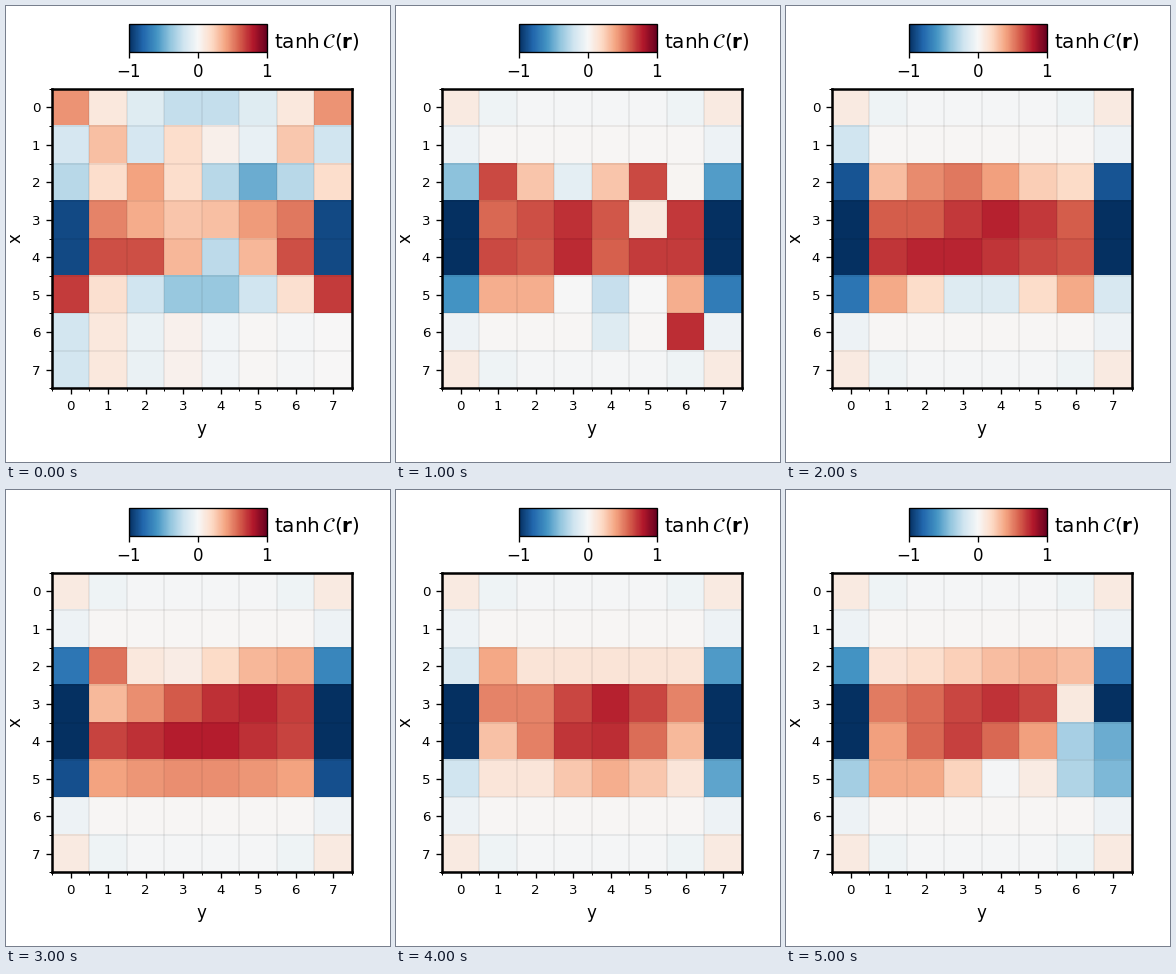
Animation of 384x456 px, one loop 6000 ms. Source, as a matplotlib script:

```python
import numpy as np
import matplotlib.pyplot as plt
from matplotlib.animation import FuncAnimation
from matplotlib.cm import ScalarMappable
from matplotlib.colors import Normalize

W, H, DPI = 384, 456, 120
N = 8
col = np.arange(N)
bowl = ((col - 3.5) / 3.5) ** 2


def wave(base, amp=0, peak=0, period=1):
    return base + amp * np.cos(2 * np.pi * (col - peak) / period)


def noisy():
    """Unordered start: bowls, ripples and a decaying zigzag."""
    zigzag = -0.18 * np.cos(np.pi * col) * np.exp(-col / 2)
    f = np.array([
        0.7 * bowl - 0.25,
        wave(0.05, 0.25, 1, 2.4),
        wave(-0.05, 0.45, 2, 6),
        wave(0.4, 0.13, 0.3, 6),
        wave(0.42, 0.28, 1.5, 5),
        1.1 * bowl - 0.4,
        zigzag,
        zigzag,
    ])
    f[3:5, ::7] = -0.9
    f[4, 4] -= 0.4
    return f


def ribbon(rows, upper, lower, bumps=()):
    """Four wavy rows between negative walls, on a calm border field."""
    f = np.full((N, N), 0.01)
    f[::7] = -0.015
    f[::7, 1::5] = -0.045
    f[::7, ::7] = 0.09
    f[1:7, ::7] = -0.05
    f[2:6, 1:7] = np.array(rows)[:, 1:7]
    f[2, ::7] = upper
    f[3:5, ::7] = -1
    f[5, ::7] = lower
    for r, c, dv in bumps:
        f[r, c] += dv
    return f


fields = [
    noisy(),
    ribbon([wave(0.28, 0.38, 1, 4),
            wave(0.65, 0.08, 2.9, 3.5),
            wave(0.67, 0.08, 5.5, 2.6),
            wave(0.10, 0.33, 1.5, 5)],
           (-0.41, -0.56), (-0.60, -0.70),
           [(2, 6, -0.26), (3, 5, -0.49), (6, 6, 0.73), (6, 4, -0.14)]),
    ribbon([wave(0.36, 0.17, 2.8, 6),
            wave(0.68, 0.09, 4, 5),
            wave(0.70, 0.07, 2.5, 7),
            wave(0.10, 0.28, 1, 5)],
           (-0.86, -0.86), (-0.73, -0.16), [(1, 0, -0.15)]),
    ribbon([wave(0.22, 0.15, 5.7, 6),
            wave(0.51, 0.25, 4.8, 10),
            wave(0.73, 0.06, 3.5, 6),
            wave(0.42, 0.05, 3.5, 8)],
           (-0.72, -0.65), (-0.88, -0.88), [(2, 1, 0.29)]),
    ribbon([wave(0.13),
            wave(0.62, 0.15, 4, 5),
            wave(0.50, 0.26, 3.6, 6.5),
            wave(0.23, 0.13, 4, 5)],
           (-0.14, -0.57), (-0.20, -0.53), [(2, 1, 0.26)]),
    ribbon([wave(0.24, 0.10, 5, 8),
            wave(0.62, 0.10, 4, 6),
            wave(0.53, 0.15, 3, 5),
            wave(0.05, 0.35, 1.5, 9)],
           (-0.60, -0.72), (-0.34, -0.45),
           [(3, 6, -0.47), (4, 6, -0.74), (4, 7, 0.5), (5, 5, 0.3)]),
]


def box(x0, y0, x1, y1):
    return [x0 / W, 1 - y1 / H, (x1 - x0) / W, (y1 - y0) / H]


fig = plt.figure(figsize=(W / DPI, H / DPI), dpi=DPI, facecolor="white")
ax = fig.add_axes(box(45.85, 82.55, 345.75, 382.45))
norm = Normalize(-1, 1)
img = ax.imshow(fields[0], cmap="RdBu_r", norm=norm, aspect="auto",
                interpolation="nearest")
ax.set_xlabel("y", fontsize=10)
ax.set_ylabel("x", fontsize=10)
ax.tick_params(labelsize=8)
for axis in (ax.xaxis, ax.yaxis):
    axis.set_ticks(range(N))
    axis.set_ticks(np.arange(N + 1) - 0.5, minor=True)
ax.grid(which="minor", color="black", linewidth=1, alpha=0.07)
for side in ax.spines.values():
    side.set_linewidth(1.5)

cax = fig.add_axes(box(122.9, 18.1, 260.9, 45.7))
bar = fig.colorbar(ScalarMappable(norm, "RdBu_r"), cax=cax,
                   orientation="horizontal", ticks=[-1, 0, 1])
bar.ax.tick_params(labelsize=10)
fig.text(268.5 / W, 1 - 42 / H, r"$\tanh\mathcal{C}(\mathbf{r})$",
         fontsize=12, va="baseline")


def draw(i):
    img.set_data(fields[i])
    return [img]


anim = FuncAnimation(fig, draw, frames=len(fields), interval=1000,
                     repeat=True, repeat_delay=0)
plt.show()
```
